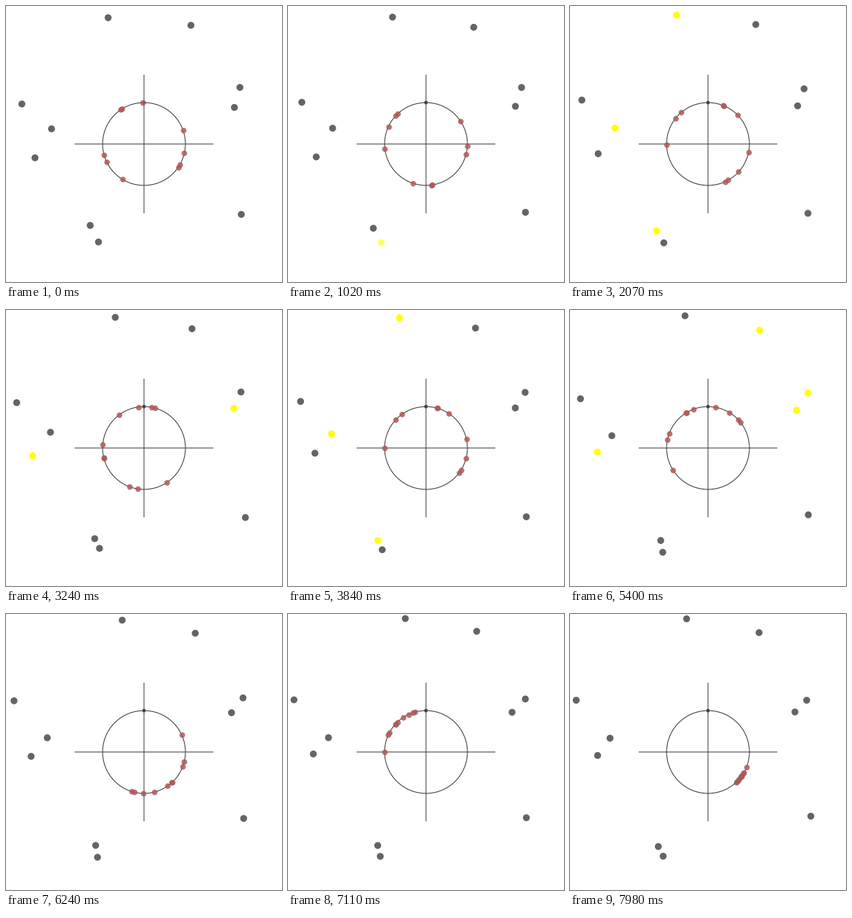
A matplotlib script that plays this animation: 400 px wide and 400 px high, repeating every 8000 ms.

```python
import matplotlib.pyplot as plt
import numpy as np
from matplotlib.animation import FuncAnimation

SIZE, DPI = 400, 100
PX = 72 / DPI
LOOP, TICK, STEP = 8000, 20, 30
LAST = (LOOP - 1) // STEP
MID, RADIUS = 200, 60
SPEED = 5.9                       # degrees per step
FLASH_FULL, FLASH_END = 52, 59    # degrees past the top of the dial
GREY, DARK = "#646464", "#444444"

# Each firefly: lead over the mean phase, start point, end point
FLIES = [
    (126, (42, 220), (40, 205)),
    (122, (331, 147), (326, 142)),
    (105, (339, 118), (343, 125)),
    (73, (268, 28), (274, 27)),
    (0, (148, 17), (169, 7)),
    (-30, (66, 178), (58, 180)),
    (-32, (122, 318), (128, 337)),
    (-103, (23, 142), (9, 125)),
    (-114, (341, 302), (349, 293)),
    (-147, (134, 342), (135, 351)),
]
lead, start, end = (np.array(col, float) for col in zip(*FLIES))


def phases(step):
    """Clockwise degrees from the top; coupling draws all to the mean phase."""
    u = step / LAST
    pull = np.exp(-1.2 * u - 2 * u ** 6)
    spread = 2 * np.degrees(np.arctan(np.tan(np.radians(lead / 2)) * pull))
    return SPEED * step - 2 + spread


def flights():
    """Jittery walks from start to end, as steps x flies x 2."""
    rng = np.random.default_rng(7)
    u = np.linspace(0, 1, LAST + 1)[:, None, None]
    walk = np.cumsum(rng.uniform(-0.5, 0.5, (LAST + 1, len(FLIES), 2)), axis=0)
    walk -= walk[0] + u * (walk[-1] - walk[0])
    return start + (end - start) * np.sin(u * np.pi / 2) + walk


def glow(angle):
    if angle < FLASH_FULL:
        return (1, 1, 0, 1)
    if angle < FLASH_END:
        return (1, 1, 0, 0.6)
    return (100 / 255, 100 / 255, 100 / 255, 1)


def dots(diameter, z, **style):
    return ax.scatter(*start.T, s=(diameter * PX) ** 2, zorder=z, **style)


fig = plt.figure(figsize=(SIZE / DPI, SIZE / DPI), dpi=DPI, facecolor="white")
ax = fig.add_axes([0, 0, 1, 1])
ax.set(xlim=(0, SIZE), ylim=(SIZE, 0))
ax.axis("off")

span, level = (MID - 100, MID + 100), (MID, MID)
for xs, ys in [(span, level), (level, span)]:
    ax.plot(xs, ys, color="#303030", lw=PX, snap=False, zorder=1)
ax.add_patch(plt.Circle((MID, MID), RADIUS, fill=False, ec=DARK,
                        lw=1.15 * PX, zorder=2))
ax.add_patch(plt.Circle((MID, MID - RADIUS), 2.6, fc=DARK, lw=0, zorder=3))

flies = dots(10, 4, c=GREY, linewidths=0)
hands = dots(7.4, 5, facecolors=(0.76, 0.32, 0.32, 0.85),
             edgecolors=(0.39, 0.39, 0.39, 0.45), linewidths=PX)
path = flights()


def draw(n):
    step = min((n * TICK + TICK // 2) // STEP, LAST)
    angle = phases(step)
    turn = np.radians(angle)
    flies.set_offsets(path[step])
    flies.set_facecolor([glow(a) for a in angle % 360])
    hands.set_offsets(np.column_stack([MID + RADIUS * np.sin(turn),
                                       MID - RADIUS * np.cos(turn)]))
    return flies, hands


anim = FuncAnimation(fig, draw, frames=LOOP // TICK, interval=TICK,
                     repeat=True, repeat_delay=0, blit=False)
plt.show()
```
